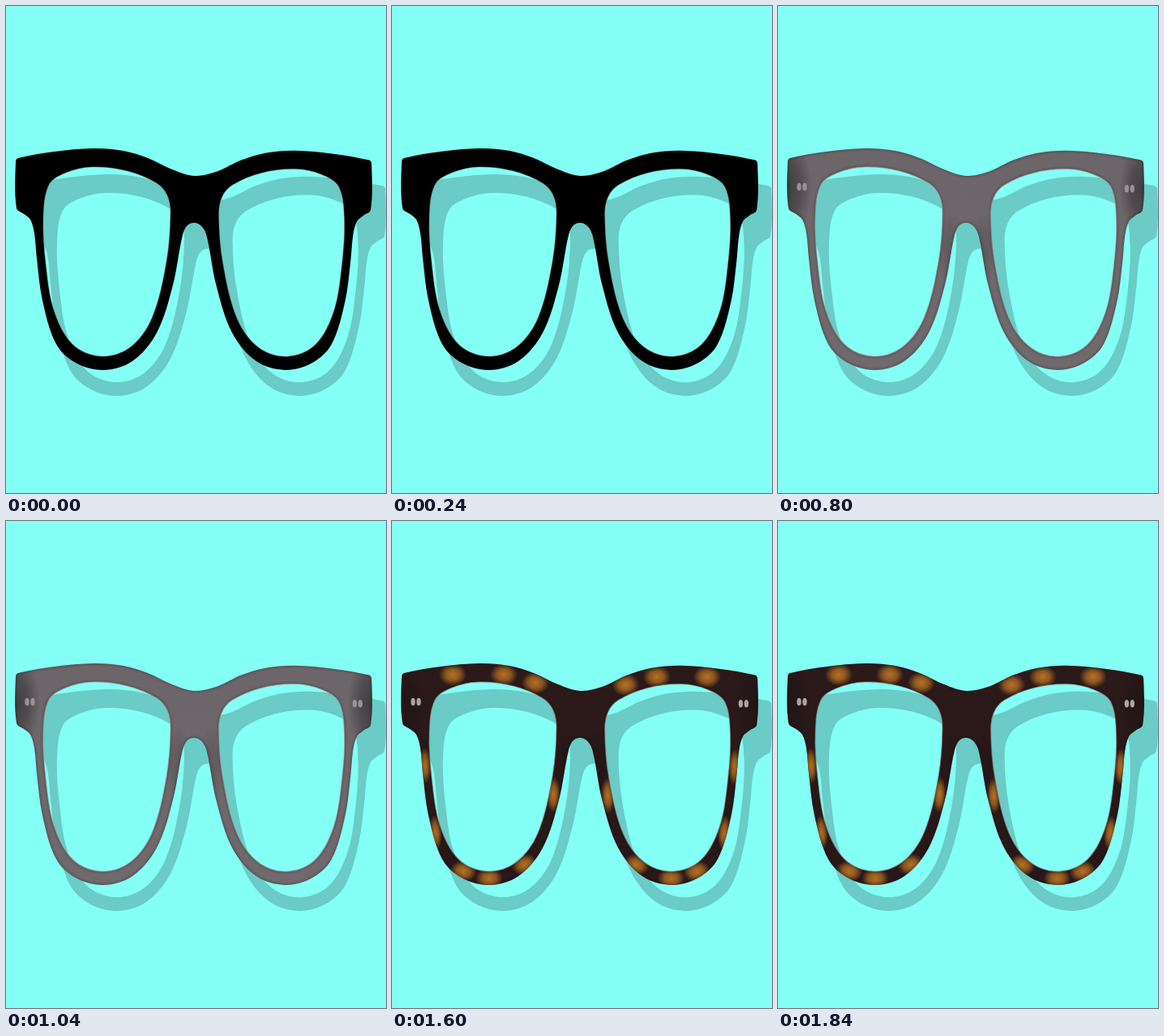
Recreate the animation shown at these times as an HTML page with a canvas. Size 469 by 602 pixels, loop 2000 ms.

```html
<!DOCTYPE html>
<html lang="en">
<head>
<meta charset="utf-8">
<title>Glasses</title>
<style>
html, body { margin: 0; width: 100%; height: 100%; overflow: hidden; background: #84fff6; }
canvas { display: block; }
</style>
</head>
<body>
<canvas id="stage" width="469" height="602"></canvas>
<script>
const ctx = document.getElementById('stage').getContext('2d');
const STEP = 400;
const CENTER = 233;

// Only the left half is given; the right half mirrors it, a little narrower and tilted.
const HALF = [
  [205, 202], [175, 188], [145, 179], [108, 176], [60, 180], [15, 188],
  [12, 192], [13, 250], [22, 257], [30, 264], [35, 281], [38, 312], [45, 364], [62, 418],
  [86, 441], [120, 450], [156, 439], [186, 404], [206, 345], [218, 283], [224, 271]
];
const LENS = [
  [53, 221], [74, 206], [107, 199], [150, 204], [186, 219], [199, 234], [203, 256],
  [198, 316], [180, 386], [153, 422], [117, 433], [82, 418], [59, 376], [49, 318], [46, 262]
];
const SPOTS = [
  [75, 190], [138, 190], [177, 200], [40, 303], [53, 386],
  [88, 433], [120, 442], [164, 425], [199, 338]
];

const mirror = ([x, y]) => [CENTER + (CENTER - x) * .987, y + (450 - y) / 100];
const both = p => [p, mirror(p)];

// Smooth closed curve through points; handles scale with each segment's length.
function smooth(points) {
  const n = points.length;
  const at = i => points[(i + n) % n];
  const gap = (a, b) => Math.hypot(b[0] - a[0], b[1] - a[1]);
  const handle = (i, reach) => {
    const p = at(i), a = at(i - 1), b = at(i + 1), k = reach / gap(a, b);
    return [p[0] + (b[0] - a[0]) * k, p[1] + (b[1] - a[1]) * k];
  };
  const path = new Path2D();
  path.moveTo(...at(0));
  for (let i = 0; i < n; i++) {
    const h = gap(at(i), at(i + 1)) / 3;
    path.bezierCurveTo(...handle(i, h), ...handle(i + 1, -h), ...at(i + 1));
  }
  path.closePath();
  return path;
}

const outline = smooth([[CENTER, 210], ...HALF, [CENTER, 268], ...HALF.map(mirror).reverse()]);
const lenses = [smooth(LENS), smooth(LENS.map(mirror))];
const rims = new Path2D();
[outline, ...lenses].forEach(p => rims.addPath(p));

const STYLES = [
  { base: ['#000', '#000'], bevel: '#80686b60' },
  { base: ['#64121c', '#7b1428'], bevel: '#b9858aa0', rivet: '#a99c9b', ends: .6, legs: .6 },
  { base: ['#6c666b', '#706a6f'], bevel: '#a39da2a0', rivet: '#979297', ends: .4, legs: .15 },
  { base: ['#a6581b', '#b05f1e'], bevel: '#d9b79ca0', rivet: '#a9958a', ends: .1, legs: .1, shift: [-1.5, .5] },
  { base: ['#2c1a1b', '#281719'], bevel: '#85736da0', rivet: '#aaa5a3', ends: .2, legs: .2, spots: true }
];

function blot([x, y], rx, ry, rgb, alpha) {
  ctx.save();
  ctx.translate(x, y);
  ctx.scale(rx, ry);
  const g = ctx.createRadialGradient(0, 0, 0, 0, 0, 1);
  g.addColorStop(0, `rgba(${rgb},${alpha})`);
  g.addColorStop(.5, `rgba(${rgb},${alpha * .7})`);
  g.addColorStop(1, `rgba(${rgb},0)`);
  ctx.fillStyle = g;
  ctx.fillRect(-1, -1, 2, 2);
  ctx.restore();
}

function fillRims(color) {
  ctx.fillStyle = color;
  ctx.fill(rims, 'evenodd');
}

function drawShadow() {
  ctx.save();
  ctx.beginPath();
  ctx.rect(42, 0, 427, 602);
  ctx.clip();
  ctx.translate(17, 32);
  fillRims('#6bcbc6');
  ctx.restore();
}

// Spots lie along the rim: upright on the sides, wide at top and bottom.
function drawSpot(p) {
  const side = p[1] > 230 && p[1] < 415;
  blot(p, side ? 9 : 17, side ? 23 : 14, '196,122,36', .9);
}

function shade(style) {
  ctx.save();
  ctx.clip(rims, 'evenodd');
  if (style.spots) SPOTS.flatMap(both).forEach(drawSpot);
  both([12, 225]).forEach(p => blot(p, 30, 60, '0,0,0', style.ends));
  both([213, 302]).forEach(p => blot(p, 16, 50, '20,12,14', style.legs));
  ctx.strokeStyle = 'rgba(0,0,0,.06)';
  for (const width of [2, 4, 7]) {
    ctx.lineWidth = width;
    ctx.stroke(rims);
  }
  ctx.restore();
}

function drawRivets(color) {
  ctx.fillStyle = color;
  for (const [x, y] of [[26, 223.5], [33, 223.5]].flatMap(both)) {
    ctx.beginPath();
    ctx.ellipse(x, y, 2.7, 4.7, 0, 0, 2 * Math.PI);
    ctx.fill();
  }
}

function drawGlasses(style) {
  ctx.save();
  if (style.shift) {
    fillRims('#06100f');
    ctx.translate(...style.shift);
  }
  const fill = ctx.createLinearGradient(0, 176, 0, 450);
  style.base.forEach((color, i) => fill.addColorStop(i, color));
  fillRims(fill);
  if (style.rivet) {
    shade(style);
    drawRivets(style.rivet);
  }
  ctx.strokeStyle = style.bevel;
  ctx.lineWidth = 1.2;
  lenses.forEach(p => ctx.stroke(p));
  ctx.restore();
}

function draw(time) {
  ctx.fillStyle = '#84fff6';
  ctx.fillRect(0, 0, 469, 602);
  drawShadow();
  drawGlasses(STYLES[Math.floor(time / STEP) % STYLES.length]);
}

const start = performance.now();
function tick() {
  draw(performance.now() - start);
  requestAnimationFrame(tick);
}
tick();
</script>
</body>
</html>
```
